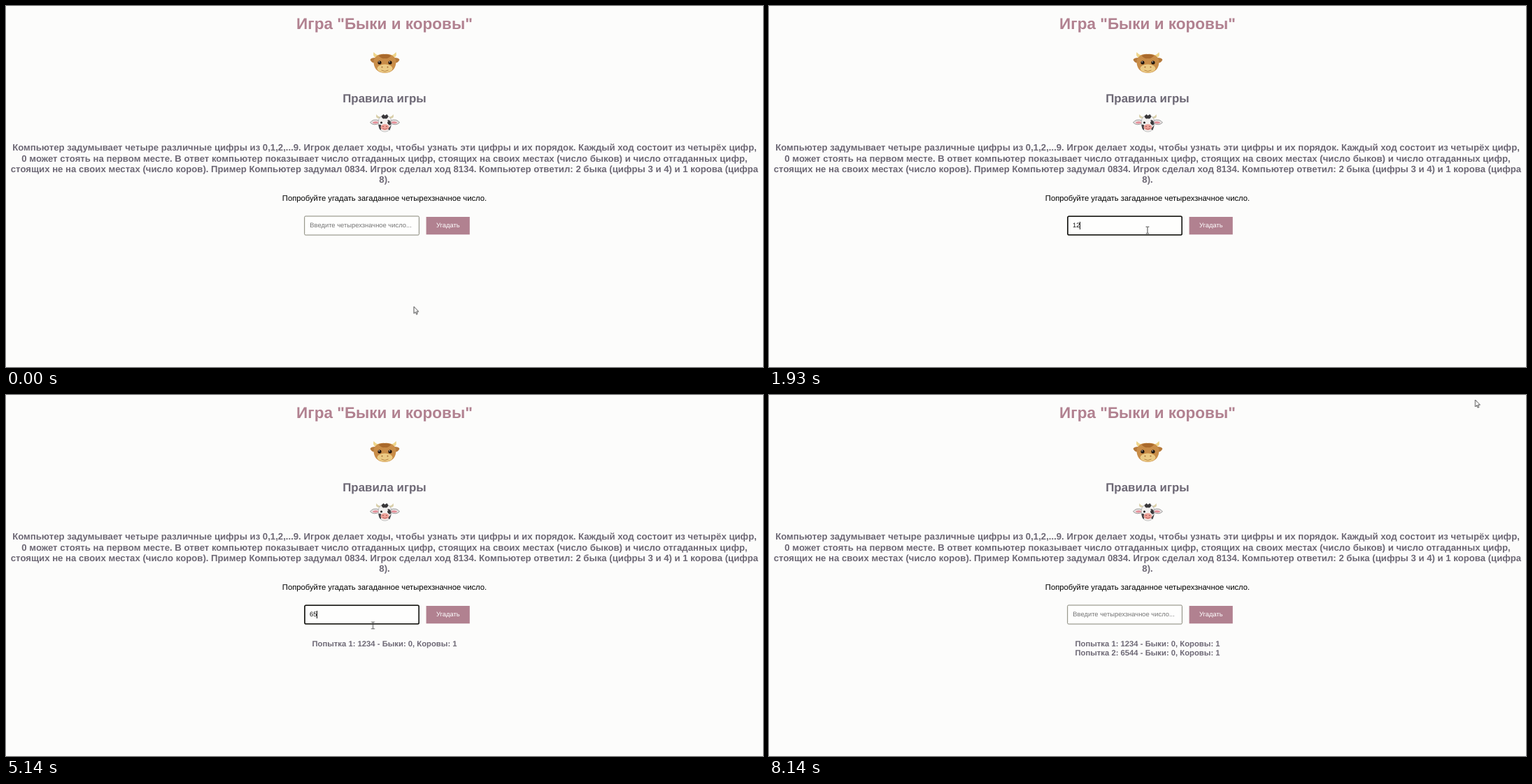
Animation of 1082 by 517 pixels, one loop 8180 ms. Source, as an HTML page:

```html
<!DOCTYPE html>
<html lang="ru">
<head>
<meta charset="utf-8">
<title>Быки и коровы</title>
<style>
html, body { margin: 0; width: 100%; height: 100%; overflow: hidden; background: #fcfcfb; }
body { position: relative; font-family: "Liberation Sans", Arial, sans-serif; text-rendering: geometricPrecision; }
svg { position: absolute; left: 0; top: 0; width: 1082px; height: 517px; }
text { text-anchor: middle; font-size: 11.27px; }
.bold { font-weight: bold; fill: #6d6875; }
.title { font-size: 22.54px; fill: #b18190; }
.sub { font-size: 16.9px; }
.rules text { font-size: 13.18px; }
.small { font-size: 9.39px; }
.left { text-anchor: start; }

.step { animation: 8180ms step-end infinite; }
.focus { animation-name: focus; }
.hint { animation-name: hint; }
.first { animation-name: first; }
.second { animation-name: second; }
.before { animation-name: before; }
.value {
  position: absolute; left: 434px; top: 309px; height: 1.15em;
  overflow: hidden; border-right: 1px solid;
  font-size: 9.39px; line-height: 1.15; color: #111;
  animation-name: type, caret;
  animation-duration: 8180ms;
  animation-timing-function: step-end;
  animation-iteration-count: infinite;
}
.value span { position: absolute; left: 0; top: 0; }
.pointer { animation: move 8180ms ease-in-out infinite; }
.arrow { animation-name: arrow; }
.beam { animation-name: beam; }
.hand { animation-name: hand; }

@keyframes focus {
  0%, 38.5%, 75.2%, 100% { visibility: hidden; }
  16.5%, 50.7% { visibility: visible; }
}
@keyframes hint {
  0%, 38.5%, 75.2%, 100% { visibility: visible; }
  19.56%, 57.46% { visibility: hidden; }
}
@keyframes before {
  0% { visibility: visible; }
  38.5%, 100% { visibility: hidden; }
}
@keyframes first {
  0% { visibility: hidden; }
  38.5%, 100% { visibility: visible; }
}
@keyframes second {
  0% { visibility: hidden; }
  75.2%, 100% { visibility: visible; }
}
@keyframes type {
  0%, 38.5%, 75.2%, 100% { width: 0; }
  19.56%, 57.46% { width: .556em; }
  22.62%, 61.12% { width: 1.112em; }
  25.67%, 64.79% { width: 1.668em; }
  28.73%, 68.46% { width: 2.224em; }
}
@keyframes caret {
  0%, 34.84%, 56.85%, 74.6%, 100% { border-color: transparent; }
  16.5%, 50.7%, 57.46% { border-color: #111; }
}
@keyframes move {
  0%, 5% { transform: translate(583px, 430.5px); }
  14.18% { transform: translate(543.5px, 326px); }
  15.9%, 30.5% { transform: translate(541px, 321px); animation-timing-function: ease-in; }
  33.86% { transform: translate(592.5px, 333px); animation-timing-function: ease-out; }
  36.8%, 41.6% { transform: translate(625px, 319px); }
  49.5%, 67.8% { transform: translate(524.5px, 330px); }
  72.2%, 77.4% { transform: translate(619px, 316.5px); }
  87.29%, 90% { transform: translate(968.5px, 29.5px); }
  98%, 100% { transform: translate(1009.5px, 7px); }
}
@keyframes arrow {
  0%, 79.2%, 100% { visibility: visible; }
  13.4% { visibility: hidden; }
}
@keyframes beam {
  0%, 35%, 70%, 100% { visibility: hidden; }
  13.4%, 45% { visibility: visible; }
}
@keyframes hand {
  0%, 45%, 79.2%, 100% { visibility: hidden; }
  35%, 70% { visibility: visible; }
}
</style>
</head>
<body>
<svg viewBox="0 0 1082 517">
  <text class="bold title" x="541" y="33">Игра "Быки и коровы"</text>

  <g transform="translate(541.5 81)">
    <path d="M-12-7Q-18-8-16-15Q-13-11-8-10ZM12-7Q18-8 16-15Q13-11 8-10Z" fill="#efd58a"/>
    <path d="M-13-7Q-20-7-21-4Q-18 2-12 0ZM13-7Q20-7 21-4Q18 2 12 0Z" fill="#b67a3b"/>
    <path d="M0-12C9-13 16-8 16-1C16 6 12 15 0 15C-12 15-16 6-16-1C-16-8-9-13 0-12Z" fill="#c98d48"/>
    <path d="M-9-10Q0-14 9-10Q5-5 0-6Q-5-5-9-10Z" fill="#a9692c"/>
    <ellipse cy="8.5" rx="11" ry="6" fill="#eccb85"/>
    <path d="M-5 11Q0 14 5 11" fill="none" stroke="#b98545"/>
    <circle cx="-4" cy="6.5" r="1" fill="#a46b34"/><circle cx="4" cy="6.5" r="1" fill="#a46b34"/>
    <circle cx="-7.5" r="2.6" fill="#20150e"/><circle cx="7.5" r="2.6" fill="#20150e"/>
    <circle cx="-8.2" cy="-1" r=".7" fill="#fff"/><circle cx="6.8" cy="-1" r=".7" fill="#fff"/>
  </g>

  <text class="bold sub" x="541" y="138">Правила игры</text>

  <g transform="translate(541.5 167)">
    <path d="M-8-6Q-14-6-12-12Q-10-8-5-8ZM8-6Q14-6 12-12Q10-8 5-8Z" fill="#d9cfa9"/>
    <path d="M-8-3Q-17-6-21 0Q-16 5-8 1ZM8-3Q17-6 21 0Q16 5 8 1Z" fill="#e8e5e5" stroke="#777" stroke-width=".7"/>
    <path d="M-9-1Q-15-3-18 0Q-14 3-9 0ZM9-1Q15-3 18 0Q14 3 9 0Z" fill="#e58f99"/>
    <path d="M0-10C8-10 10-5 9 3C8 10 5 13 0 13C-5 13-8 10-9 3C-10-5-8-10 0-10Z" fill="#f2f0ef" stroke="#999" stroke-width=".6"/>
    <path d="M-5-9L-2-12L0-10L3-12L5-9Q3-4 0-6Q-3-4-5-9Z" fill="#3a383b"/>
    <path d="M4-4Q9-4 9 2Q8 5 5 3ZM-9 3Q-4 2-5 8L-6 11Q-9 8-9 3ZM9 4L7 11L4 9Z" fill="#454347"/>
    <ellipse cy="6.5" rx="6" ry="4.3" fill="#eda299"/>
    <path d="M-3 8.5Q0 10.5 3 8.5" fill="none" stroke="#a84d4d" stroke-width=".8"/>
    <circle cx="-2.5" cy="5.5" r=".8" fill="#8c4747"/><circle cx="2.5" cy="5.5" r=".8" fill="#8c4747"/>
    <circle cx="-5" cy="0" r="1.5" fill="#222"/><circle cx="5" cy="0" r="1.5" fill="#111"/>
    <circle cx="4.6" cy="-.5" r=".5" fill="#fff"/>
  </g>

  <g class="rules">
    <text class="bold" x="541" y="207.3">Компьютер задумывает четыре различные цифры из 0,1,2,...9. Игрок делает ходы, чтобы узнать эти цифры и их порядок. Каждый ход состоит из четырёх цифр,</text>
    <text class="bold" x="541" y="222.5">0 может стоять на первом месте. В ответ компьютер показывает число отгаданных цифр, стоящих на своих местах (число быков) и число отгаданных цифр,</text>
    <text class="bold" x="541" y="237.7">стоящих не на своих местах (число коров). Пример Компьютер задумал 0834. Игрок сделал ход 8134. Компьютер ответил: 2 быка (цифры 3 и 4) и 1 корова (цифра</text>
    <text class="bold" x="541" y="252.9">8).</text>
  </g>
  <text x="541" y="279.3">Попробуйте угадать загаданное четырехзначное число.</text>

  <rect x="426.7" y="301" width="163.7" height="27" rx="1.5" fill="#fefefd" stroke="#767668" stroke-width=".9"/>
  <rect class="step focus" x="427" y="301.2" width="163.2" height="26.6" rx="1.8" fill="none" stroke="#161613" stroke-width="1.6"/>
  <text class="step hint small left" x="434.3" y="317.3" fill="#757575">Введите четырехзначное число...</text>
  <rect x="600.6" y="302" width="62.2" height="25.3" fill="#b18190"/>
  <text class="small" x="631.8" y="317.3" fill="#fff">Угадать</text>

  <text class="bold step first" x="541" y="359.8">Попытка 1: 1234 - Быки: 0, Коровы: 1</text>
  <text class="bold step second" x="541" y="372.8">Попытка 2: 6544 - Быки: 0, Коровы: 1</text>
</svg>

<div class="value"><span class="step before">1234</span><span class="step first">6544</span></div>

<svg viewBox="0 0 1082 517">
  <g class="pointer">
    <path class="step arrow" d="M0 0V9.8L2.2 7.8L3.7 11.2L5.2 10.5L3.8 7.2H6.8Z" fill="#fff" stroke="#222" stroke-width=".8"/>
    <path class="step beam" d="M-2.4-4.8H-.6L0-4.3L.6-4.8H2.4M0-4.3V4.3M-2.4 4.8H-.6L0 4.3L.6 4.8H2.4" fill="none" stroke="#333" stroke-width=".9"/>
    <path class="step hand" d="M-1.2 1Q0-.8 1.2 1V4.4Q2.3 3.7 3 4.8Q4.2 4.2 4.6 5.3Q6 5 6 6.5V9Q6 11 4.7 12.5H-.2Q-.6 11-3.3 8Q-3.8 6.6-2.4 6.6L-1.2 7.6Z" fill="#fff" stroke="#222" stroke-width=".8"/>
  </g>
</svg>
</body>
</html>
```
